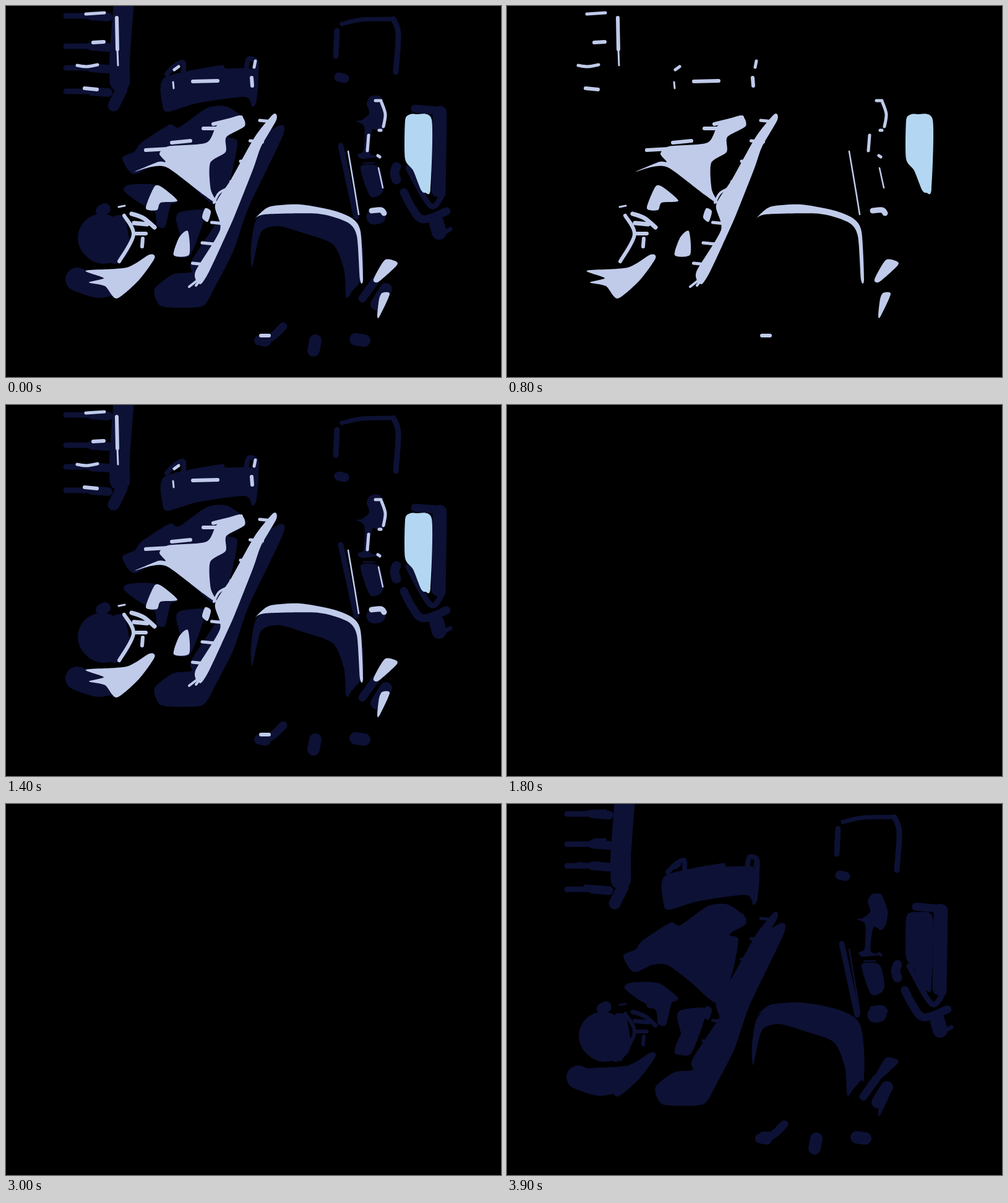
Write an HTML page with a canvas that moves like this. It is 800 px wide and 600 px high and loops after 4.4 s.

```html
<!DOCTYPE html>
<html lang="en">
<head>
<meta charset="utf-8">
<title>Night room</title>
<style>
html, body { margin: 0; width: 100%; height: 100%; overflow: hidden; background: #000; }
canvas { display: block; }
</style>
</head>
<body>
<canvas id="stage" width="800" height="600"></canvas>
<script>
const ctx = document.getElementById('stage').getContext('2d');
ctx.lineCap = ctx.lineJoin = 'round';

const NAVY = '#0d1135', PALE = '#c0cbea', SKY = '#b3d7f2';
const PINK = '#f57678', RED = '#ed2224', MAROON = '#481212';
const LOOP = 4400;

function setColor(color) { ctx.fillStyle = ctx.strokeStyle = color; }

// Smooth curve through the points of a string "x y x y ..."
function trace(text, closed) {
  const n = text.split(' ').map(Number), count = n.length / 2;
  const at = i => {
    i = closed ? (i + count) % count : Math.max(0, Math.min(count - 1, i));
    return [n[2 * i], n[2 * i + 1]];
  };
  const k = closed ? 8 : 6;
  ctx.beginPath();
  ctx.moveTo(...at(0));
  for (let i = 0; i < (closed ? count : count - 1); i++) {
    const [a, b, c, d] = [at(i - 1), at(i), at(i + 1), at(i + 2)];
    ctx.bezierCurveTo(b[0] + (c[0] - a[0]) / k, b[1] + (c[1] - a[1]) / k,
      c[0] - (d[0] - b[0]) / k, c[1] - (d[1] - b[1]) / k, c[0], c[1]);
  }
}
function blob(...shapes) {
  for (const s of shapes) { trace(s, true); ctx.fill(); }
}
function lines(width, ...paths) {
  ctx.lineWidth = width;
  for (const p of paths) { trace(p, false); ctx.stroke(); }
}

// Small bent marks strewn along a band, the same on every call
function scatter(count, width, size, tilt, spread, band) {
  const [x0, y0, x1, y1] = band.split(' ').map(Number);
  const length = Math.hypot(x1 - x0, y1 - y0);
  let seed = x0 * y1 + count;
  const random = () => (seed = (seed * 16807) % 2147483647) / 2147483647 - 0.5;
  for (let i = 0; i < 5; i++) random();
  ctx.lineWidth = width;
  for (let i = 0; i < count; i++) {
    const t = (i + 0.5) / count, off = 2 * spread * random() / length;
    const x = x0 + t * (x1 - x0) + off * (y0 - y1), y = y0 + t * (y1 - y0) + off * (x1 - x0);
    const angle = tilt + random(), reach = size * (0.5 + random() * 0.4), bend = size * random();
    const dx = Math.cos(angle) * reach, dy = Math.sin(angle) * reach;
    ctx.beginPath();
    ctx.moveTo(x - dx, y - dy);
    ctx.quadraticCurveTo(x - bend * dy / reach, y + bend * dx / reach, x + dx, y + dy);
    ctx.stroke();
  }
}

function pane() {
  blob('645 186 651 176 662 175 688 184 686 296 678 302 671 298 658 266 645 247');
}

function sleeper() {
  blob('226 327 240 292 252 293 277 315 250 318 244 330',
    '317 342 322 327 331 332 326 349',
    '271 403 280 374 294 364 296 402',
    '129 428 195 423 232 402 240 408 215 443 179 473 160 453 134 447 158 440');
  lines(6, '191 339 206 370 183 413', '210 368 226 368', '221 376 220 389');
  lines(7, '203 336 222 343 240 358', '207 351 228 353');
}

function shadowRoom() {
  // shelf
  lines(33, '190 0 184 80 184 122');
  lines(19, '187 135 174 161');
  for (const y of [16, 65, 100, 138]) {
    lines(9, `97 ${y} 140 ${y}`);
    lines(14, `138 ${y} 165 ${y + 2}`);
  }
  // bed
  blob('256 116 346 96 356 101 405 104 405 152 398 163 386 147 310 157 262 171 253 160');
  lines(8, '388 104 392 86 404 90 404 110', '260 110 273 97 286 91 287 106');
  // blankets
  blob('188 246 208 235 219 221 264 192 280 196 325 165 358 163 387 187 360 211 374 220 362 280 338 322 270 262 245 255 206 272',
    '440 194 448 208 392 326 368 395 338 454 320 484 292 488 250 485 240 458 270 434 300 430 300 412 352 330 392 232');
  // sleeper
  blob('190 298 200 289 245 290 275 316 266 322 257 357 244 355 240 333 212 316',
    '275 345 282 333 320 330 318 352 297 404 272 402 282 378');
  lines(78, '155 375 158 378');
  lines(18, '154 331 160 328');
  lines(24, '182 350 188 390 175 405');
  lines(38, '115 442 150 453 185 445');
  // chair
  blob('398 422 396 390 405 345 440 325 500 324 556 342 574 370 577 435 559 462 550 471 546 425 528 385 480 367 440 356 412 366');
  lines(16, '409 541 420 543');
  lines(13, '420 541 434 532 448 518', '576 473 597 444');
  lines(20, '497 557 500 541', '565 539 579 541', '599 482 614 458');
  // window frame
  lines(13, '661 166 705 170', '643 301 656 326 674 345 712 332');
  lines(23, '701 173 700 240 699 298');
  lines(9, '706 304 686 323 650 262');
  lines(24, '696 351 700 366');
  lines(7, '709 366 718 361');
  lines(15, '631 260 628 270 631 281');
  // lamp
  blob('583 157 590 146 606 148 613 190 605 203 592 200 588 238 606 243 575 247 568 240 578 234 579 195 565 186 574 185 587 174',
    '573 260 602 260 610 292 605 305 588 307');
  lines(25, '595 341 601 340');
  lines(2, '577 254 596 254');
  lines(9, '541 226 555 290 566 341', '535 40 533 81', '626 21 634 45 630 107');
  lines(7, '543 29 575 22 626 21');
  lines(15, '538 115 547 117');
}

function lightRoom() {
  sleeper();
  lines(3, '182 325 192 323');
  // shelf and bed
  lines(5, '129 13 159 11', '115 96 130 98 148 95', '272 103 279 98', '403 89 401 99');
  lines(6, '141 59 158 58', '127 133 147 135', '302 122 342 121', '397 116 398 129', '179 19 180 70');
  lines(3, '270 123 271 133', '180 70 181 96');
  // blankets
  blob('208 268 246 252 258 252 248 239 262 227 324 221 342 192 378 177 386 194 356 212 355 236 330 254 331 297 342 320 319 305 262 262 236 260',
    '432 175 437 184 412 228 400 262 370 338 354 374 328 430 314 450 306 430 346 362 338 322 364 280 402 212');
  lines(6, '226 233 262 231', '319 198 345 198', '335 191 380 180', '268 221 298 218');
  for (let i = 0; i < 8; i++) {
    const x = 410 - 15.5 * i, y = 185 + i * 33;
    lines(5, `${x} ${y} ${x + 20} ${y + 2}`);
  }
  lines(4, '296 454 314 440', '307 452 316 440', '336 318 345 302 365 292');
  // chair
  blob('402 345 425 325 475 321 530 331 560 344 573 365 577 442 572 442 567 372 552 350 505 336 418 337');
  lines(6, '412 533 425 533');
  blob('594 442 612 411 630 413 631 420 602 446', '603 474 608 464 620 466 603 503 600 500');
  // lamp
  lines(2.5, '553 235 564 300 570 337', '602 262 609 294');
  lines(5, '597 153 606 153', '607 156 613 175 610 195', '603 201 606 201', '586 209 584 234', '601 242 604 244');
  lines(9, '591 331 606 330 611 335');
}

function embers() {
  sleeper();
  // tree and bed
  lines(4, '149 16 170 13 185 38', '126 60 160 56 187 81', '121 92 147 93 157 106',
    '267 97 268 124 273 133', '388 107 408 133', '306 117 312 126 325 117', '407 98 402 110');
  lines(5, '198 74 202 108', '176 113 193 134');
  scatter(6, 3, 9, 0.2, 12, '208 30 222 112');
  scatter(4, 3, 10, 0, 10, '140 205 172 270');
  // blankets
  scatter(12, 5, 20, 0.3, 7, '258 232 378 178');
  lines(6, '230 256 255 244 272 255');
  scatter(5, 5, 24, 0.8, 12, '295 268 330 220');
  scatter(18, 4.5, 21, 0.5, 18, '420 180 335 295');
  scatter(9, 4, 25, 1, 20, '362 310 325 415');
  scatter(4, 4, 20, -0.3, 8, '208 303 275 350');
  scatter(8, 3.5, 16, 0.3, 16, '232 475 330 480');
  // lamp
  scatter(15, 4, 17, -0.2, 12, '605 155 566 322');
}

function cracks() {
  setColor('#000');
  lines(3, '235 306 248 302', '172 460 177 445', '188 440 204 456', '217 430 222 414');
}

function brambles() {
  // tree
  lines(20, '190 18 199 35 198 122');
  lines(7, '198 130 198 152 222 173', '198 150 184 165 188 177', '173 112 198 138');
  lines(6, '143 14 172 13 186 22', '153 38 188 30', '118 57 163 60 188 76', '108 90 147 94 157 108',
    '220 27 207 60 240 47', '222 87 210 112 232 110');
  // bed
  blob('317 118 345 102 378 118 345 120');
  lines(7, '284 160 268 135 266 98 284 90 284 115', '270 123 365 128 380 137', '308 113 308 140',
    '388 120 405 122 415 145', '390 93 404 92 404 120', '320 122 385 116');
  // branch
  blob('161 216 206 198 184 233 166 230');
  lines(6, '122 210 170 222', '195 208 250 183', '195 230 190 255 160 286', '162 254 192 240');
  // wisps
  lines(4, '293 47 320 69', '350 28 376 53', '445 46 461 84', '478 44 494 50 496 72', '472 65 486 87',
    '532 78 528 124', '555 114 545 150 524 180', '572 76 590 43 628 36', '579 82 594 65', '624 84 590 111',
    '650 62 675 62', '460 177 479 208');
  lines(6, '498 84 498 88', '513 130 509 138');
  // blankets
  blob('208 278 245 240 275 262 230 268', '350 312 380 270 396 334 368 318');
  lines(9, '240 232 272 222 292 246', '308 225 320 250 355 270', '405 180 430 182 436 216',
    '325 275 366 300', '290 304 298 335');
  lines(7, '402 200 432 235 437 252', '385 225 410 240 424 293', '360 230 395 255 408 306',
    '350 315 375 335 392 380', '283 262 305 285 336 306');
  scatter(9, 7, 20, 0.5, 8, '270 215 378 182');
  scatter(6, 7, 30, 0.3, 10, '310 225 390 295');
  // floor
  blob('335 375 352 380 366 442 352 440', '270 450 300 447 326 485 306 486 304 468');
  lines(6, '245 358 270 347 300 354', '252 335 270 348', '355 440 378 446', '286 424 340 408',
    '243 446 275 455', '258 430 272 442', '222 467 236 484', '188 310 222 292');
  lines(8, '220 489 300 485 322 490 340 502');
  // twigs on the head
  lines(4, '118 341 163 334', '104 370 122 383 180 375', '120 402 140 410 176 406');
  scatter(10, 4, 26, 0, 26, '120 355 175 385');
  // lamp
  lines(7, '604 135 608 185 580 228', '582 155 590 195', '585 225 612 214');
  lines(5, '540 270 562 240 585 232', '543 303 556 284 600 272', '551 328 575 300 608 320');
  scatter(10, 5, 28, -0.4, 12, '570 260 588 400');
  // window vines
  lines(7, '692 330 712 332 733 310 737 220 725 172');
  for (const y of [193, 230, 268, 293]) lines(7, `704 ${y + 6} 716 ${y - 2} 732 ${y + 4}`);
  lines(5, '674 165 692 165', '700 169 732 166', '658 162 668 156 684 160', '660 318 678 345',
    '699 352 708 353', '640 270 642 282', '650 283 650 300', '674 388 692 387', '716 383 728 366',
    '734 382 712 412 667 434', '608 457 636 436 665 408', '626 420 647 383');
}

function navy() { setColor(NAVY); shadowRoom(); lightRoom(); pane(); }
function pale() { setColor(PALE); lightRoom(); setColor(SKY); pane(); }
function full() { navy(); pale(); }
function dark() {}
function ember() { setColor(PINK); embers(); cracks(); setColor(RED); pane(); }
function maroon() { setColor(MAROON); brambles(); embers(); pane(); cracks(); }
function burning() { maroon(); ember(); }

const flicker = [full, navy, full, navy, pale, full, navy, full, pale];
const fire = [ember, dark, burning];

function sceneAt(t) {
  if (t < 1800) return flicker[Math.floor(t / 200)];
  if (t < 2800) return dark;
  if (t < 3400) return fire[Math.floor((t - 2800) / 200)];
  return t < 3900 ? maroon : navy;
}

const start = performance.now();
let shown;
function tick() {
  const scene = sceneAt((performance.now() - start) % LOOP);
  if (scene !== shown) {
    setColor('#000');
    ctx.fillRect(0, 0, 800, 600);
    scene();
    shown = scene;
  }
  requestAnimationFrame(tick);
}
tick();
</script>
</body>
</html>
```
